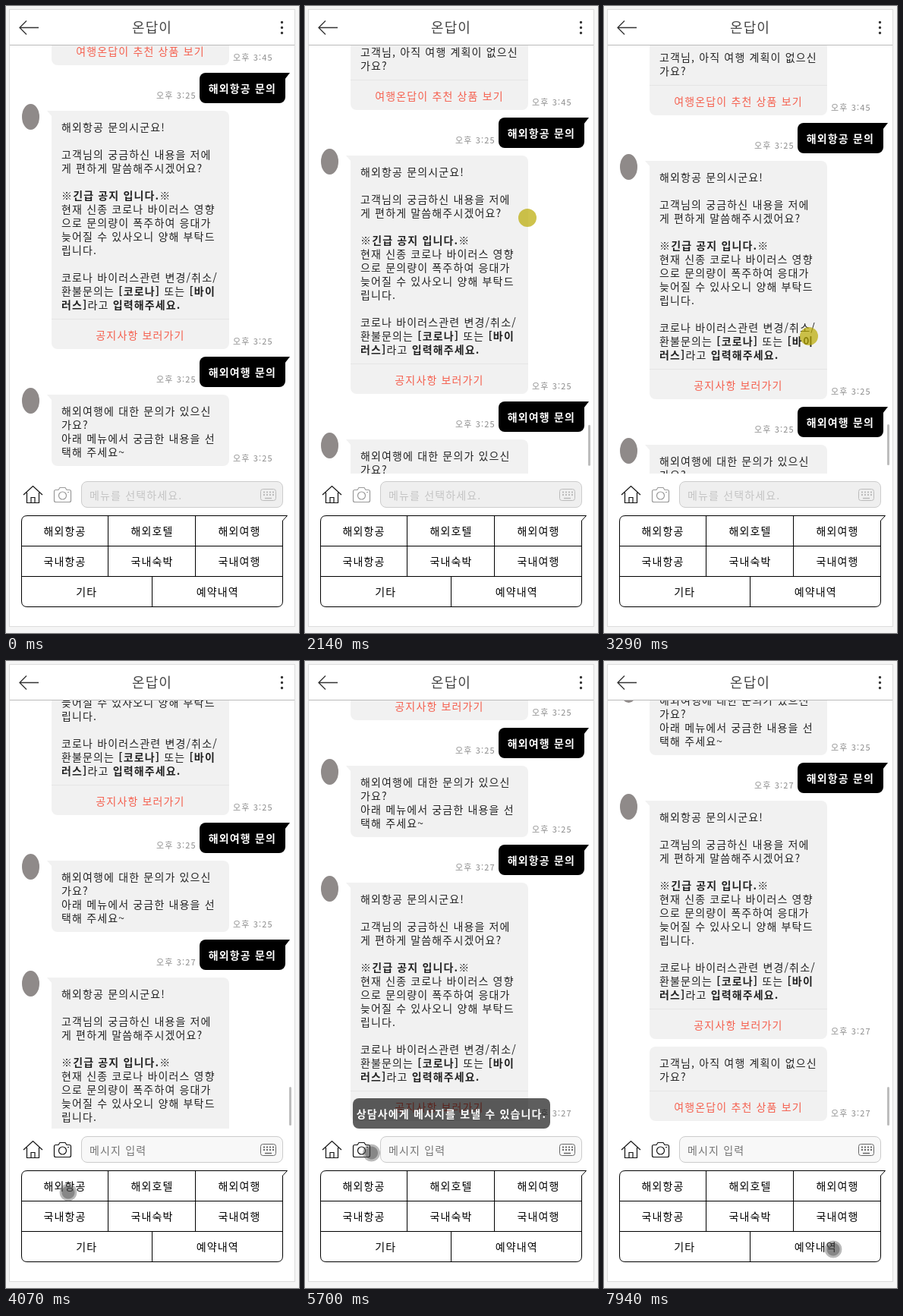
Recreate the animation shown at these times as an HTML page. Size 386 by 826 pixels, loop 8000 ms.

```html
<!DOCTYPE html>
<html lang="ko">
<head>
<meta charset="utf-8">
<title>온답이</title>
<style>
html, body { margin: 0; width: 100%; height: 100%; overflow: hidden; background: #f5f5f5; }
body { position: relative; font: 14px/18px "Noto Sans CJK KR", "Noto Sans CJK", sans-serif; letter-spacing: 1.15px; color: #222; white-space: nowrap; }
body * { position: absolute; box-sizing: border-box; }
p b { position: static; font-weight: 600; }
#panel { left: 4px; top: 4px; width: 377px; height: 814px; background: #fff; border: 1px solid #ddd; }
#title { left: 5px; top: 5px; width: 375px; height: 47px; border-bottom: 1px solid #bbb; font-size: 18px; line-height: 45px; text-align: center; color: #444; }
#chat { left: 5px; top: 52px; width: 375px; height: 564px; overflow: hidden; }
#feed { left: -5px; top: -52px; width: 386px; }
.msg { left: 0; width: 386px; }
.bot { left: 60px; width: 234px; height: 100%; background: #f1f1f1; border-radius: 8px; }
.bot p { margin: 0; left: 13px; top: 12px; }
.bot .link { left: 0; bottom: 0; width: 100%; height: 40px; border-top: 1px solid #e5e5e5; line-height: 40px; text-align: center; color: #f5604f; }
.tailed { border-top-left-radius: 0; }
.tailed::before { content: ""; position: absolute; left: -6px; top: 0; width: 7px; height: 8px; background: #f1f1f1; clip-path: polygon(0 0, 100% 0, 100% 100%); }
.avatar { left: 21px; top: -9px; width: 23px; height: 34px; border-radius: 50%; background: #8f8a89; }
.user { right: 18px; height: 40px; padding: 0 12px; border-radius: 8px 0 8px 8px; background: #000; color: #fff; font-weight: 600; line-height: 40px; }
.user::after { content: ""; position: absolute; right: -6px; top: 0; width: 7px; height: 9px; background: #000; clip-path: polygon(0 0, 100% 0, 0 100%); }
time { bottom: 2px; font-size: 11px; font-weight: 300; line-height: 18px; color: #8e8e8e; }
.user time { right: 100%; margin-right: 4px; }
.msg > time { left: 299px; }
.dot { top: 38px; width: 6px; height: 6px; border-radius: 50%; background: #000; }
#thumb { left: 373px; top: 0; width: 3px; border-radius: 2px; background: #bdbdbd; }
#field { left: 99px; top: 626px; width: 266px; height: 35px; padding-left: 10px; border: 1px solid #ccc; border-radius: 8px; line-height: 34px; background: #efefef; color: #c4c4c4; }
#field.on { background: #f8f8f8; color: #757575; }
#menu div { height: 40px; line-height: 41px; text-align: center; color: #000; }
#toast { left: 63px; top: 576px; width: 260px; height: 40px; border-radius: 8px; background: rgba(0,0,0,.63); color: #fff; font-weight: 600; line-height: 41px; text-align: center; }
#pointer { left: -12px; top: -12px; width: 24px; height: 24px; border-radius: 50%; background: radial-gradient(circle, rgba(70,70,70,.65) 0 8px, rgba(90,90,90,.42) 9px 11px, transparent 11.8px); }
#pointer.down { background: rgba(185,170,0,.7); }
</style>
</head>
<body>
<div id="panel"></div>
<div id="title">온답이</div>
<div id="chat"><div id="feed"></div></div>
<div id="field"></div>
<div id="menu"></div>
<svg width="386" height="826" fill="none" stroke="#111">
  <path d="M43 28.5H18M27 19.5L18 28.5L27 37.5" stroke="#333" stroke-width="1.3"/>
  <path d="M363.5 21.500V37" stroke="#333" stroke-width="3.400" stroke-linecap="round" stroke-dasharray="0 7"/>
  <path d="M23 644L35.500 632.500L48 644M27.500 641V654.500H43.500V641M33 654.500V647.500H38V654.500" stroke-width="1.2"/>
  <g id="camera" stroke-width="1.2"><path d="M65.500 637.500H69L71 634.500H78L80 637.500H83.500Q85.500 637.500 85.500 639.500V651.500Q85.500 653.500 83.500 653.500H65.500Q63.500 653.500 63.500 651.500V639.500Q63.500 637.500 65.500 637.500Z"/><circle cx="74.500" cy="645" r="5"/><path d="M81 640.500H83"/></g>
  <g id="keys"><rect x="335.500" y="636.500" width="20" height="15" rx="3"/><path d="M339 640.500H353M339 644H353" stroke-width="2" stroke-dasharray="2"/><path d="M341 648.500H350" stroke-width="1.500"/></g>
  <path d="M370.500 671.500H28Q20.500 671.500 20.500 679V784Q20.500 791.500 28 791.500H357Q364.500 791.500 364.500 784V678ZM20.500 711.500H364.500M20.500 751.500H364.500M134.500 671.500V751.500M249.500 671.500V751.500M192.500 751.500V791.500" stroke="#000"/>
</svg>
<div id="thumb"></div>
<div id="toast">상담사에게 메시지를 보낼 수 있습니다.</div>
<div id="pointer"></div>
<script>
const $ = id => document.getElementById(id);
const LOOP = 8000, TICK = 77, LEAD = 21;

const FLIGHT = ['해외항공 문의시군요!', '', '고객님의 궁금하신 내용을 저에', '게 편하게 말씀해주시겠어요?', '',
  '<b>※긴급 공지 입니다.※</b>', '현재 신종 코로나 바이러스 영향', '으로 문의량이 폭주하여 응대가', '늦어질 수 있사오니 양해 부탁드', '립니다.', '',
  '코로나 바이러스관련 변경/취소/', '환불문의는 <b>[코로나]</b> 또는 <b>[바이</b>', '<b>러스]</b>라고 <b>입력해주세요.</b>'];
const TRIP = ['해외여행에 대한 문의가 있으신', '가요?', '아래 메뉴에서 궁금한 내용을 선', '택해 주세요~'];
const ETC = ['기타사항에 대해 궁금한 부분을', '아래에서 선택해주세요~'];
const PLAN = ['고객님, 아직 여행 계획이 없으신', '가요?'];
const NOTICE = '공지사항 보러가기', GOODS = '여행온답이 추천 상품 보기';

let nextTop = -728;
function add(height, html) {
  const el = document.createElement('div');
  el.className = 'msg';
  el.style.cssText = `top:${nextTop}px;height:${height}px`;
  el.innerHTML = html;
  $('feed').append(el);
  nextTop += height + 10;
  return el;
}
const stamp = time => `<time>오후 ${time}</time>`;
const user = (text, time) => add(40, `<div class="user">${text}${stamp(time)}</div>`);
function bot(lines, time, link, tailed = true) {
  const avatar = tailed ? '<div class="avatar"></div>' : '';
  const foot = link ? `<div class="link">${link}</div>` : '';
  return add(lines.length * 18 + (link ? 62 : 22),
    `${avatar}<div class="bot ${tailed ? 'tailed' : ''}"><p>${lines.join('<br>')}</p>${foot}</div>${stamp(time)}`);
}

bot(PLAN, '1:18', GOODS, false);
user('해외항공 문의', '1:18');
bot(FLIGHT, '1:18', NOTICE);
user('기타문의', '1:18');
bot(ETC, '1:18');
bot(PLAN, '3:44', GOODS, false);
bot(PLAN, '3:45', GOODS, false);
user('해외항공 문의', '3:25');
bot(FLIGHT, '3:25', NOTICE);
user('해외여행 문의', '3:25');
bot(TRIP, '3:25');
const answers = [user('해외항공 문의', '3:27'), bot(FLIGHT, '3:27', NOTICE)];
const typingTop = nextTop;
const typing = add(59, `<div class="avatar"></div><div class="bot tailed" style="width:115px"><p>메세지 입력중</p>
  ${[0, 1, 2].map(i => `<div class="dot" style="left:${42 + i * 12}px"></div>`).join('')}</div>`);
nextTop = typingTop;
const offer = bot(PLAN, '3:27', GOODS, false);

['해외항공 해외호텔 해외여행', '국내항공 국내숙박 국내여행', '기타 예약내역'].forEach((row, r) => {
  const labels = row.split(' '), width = 345 / labels.length;
  labels.forEach((text, c) => {
    const cell = document.createElement('div');
    cell.textContent = text;
    cell.style.cssText = `left:${20 + c * width}px;top:${671 + r * 40}px;width:${width}px`;
    $('menu').append(cell);
  });
});

// Pointer glides: start tick, end tick, destination.
const GLIDES = [[4, 7, 269, 553], [9, 20, 242, 325], [20, 24, 285, 222], [24, 28, 293, 279], [28, 34, 296, 401],
  [34, 43, 270, 435], [43, 50, 82, 700], [53, 59, 134, 693], [59, 72, 94, 648], [72, 76, 81, 648],
  [79, 87, 94, 652], [95, 99, 302, 775]];

const ramp = (tick, from, to) => Math.min(1, Math.max(0, (tick - from) / (to - from)));
const show = (el, on) => { el.style.visibility = on ? 'visible' : 'hidden'; };

function pointerAt(tick) {
  let x = 273, y = 695;
  for (const [from, to, toX, toY] of GLIDES) {
    const k = ramp(tick, from, to);
    x += (toX - x) * k;
    y += (toY - y) * k;
  }
  return `translate(${x}px, ${y}px)`;
}

// One swing up through the history and back, then a shift per new message.
function scrollAt(tick) {
  const swing = 664.6 * Math.sin(Math.PI * ramp(tick, 24.2, 46.93)) ** 3.5;
  const typingShift = tick < 62 ? 69 * ramp(tick, 55, 57) : 0;
  return Math.round(swing - 374 * ramp(tick, 51, 54) - typingShift - 108 * ramp(tick, 95, 97));
}

function draw(ms) {
  const tick = Math.floor((ms + LEAD) / TICK);
  const within = (from, to) => tick >= from && tick < to;
  const scroll = scrollAt(tick), active = tick >= 52;

  $('feed').style.transform = `translateY(${scroll}px)`;
  answers.forEach(el => show(el, tick >= 51));
  show(typing, within(55, 62));
  show(offer, tick >= 96);

  $('thumb').style.height = scroll < 0 ? '51px' : '54px';
  $('thumb').style.transform = `translateY(${scroll < 0 ? 561 : 557.5 - scroll * .0975}px)`;
  $('thumb').style.opacity = ramp(tick, 24, 25) - ramp(tick, 66, 72) + ramp(tick, 95, 96);
  $('toast').style.opacity = ramp(tick, 53, 59.3) - ramp(tick, 79, 87);

  $('field').className = active ? 'on' : '';
  $('field').textContent = active ? '메시지 입력' : '메뉴를 선택하세요.';
  $('camera').setAttribute('stroke', active ? '#111' : '#999');
  $('keys').setAttribute('stroke', active ? '#666' : '#bbb');

  show($('pointer'), tick >= 4);
  $('pointer').className = within(24, 46) || within(50, 52) ? 'down' : '';
  $('pointer').style.transform = pointerAt(tick);
}

const start = performance.now();
function loop() {
  draw((performance.now() - start) % LOOP);
  requestAnimationFrame(loop);
}
loop();
</script>
</body>
</html>
```
